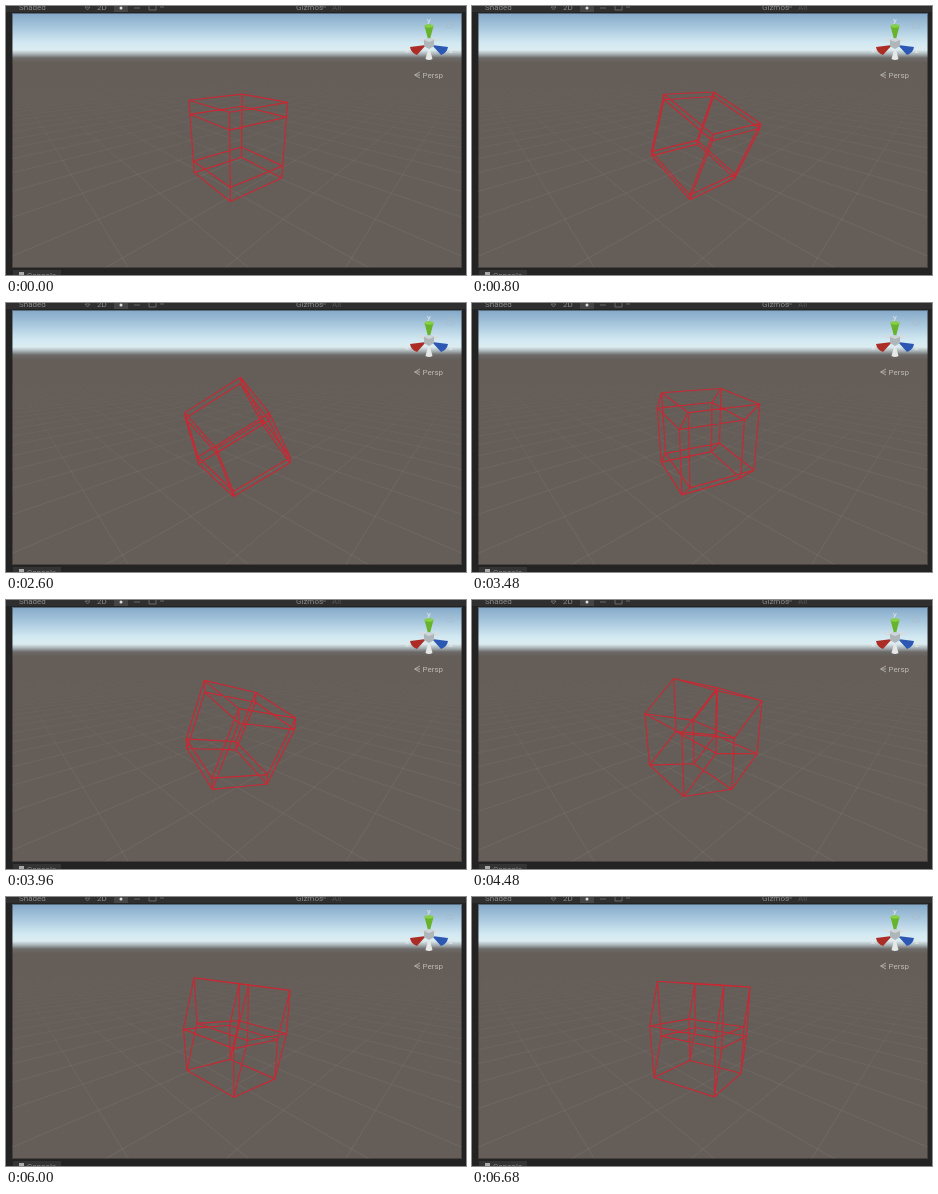
These frames come from a looping animation (460 by 269 pixels, 6720 ms). An HTML page:

```html
<!DOCTYPE html>
<html lang="en">
<head>
<meta charset="utf-8">
<title>Rotating hypercube</title>
<style>
html, body { margin: 0; width: 100%; height: 100%; overflow: hidden; background: #242323; }
svg { display: block; width: 460px; height: 269px; font-family: Roboto, "Open Sans", sans-serif; }
</style>
</head>
<body>
<svg viewBox="0 0 460 269">
  <defs>
    <linearGradient id="sky" gradientUnits="userSpaceOnUse" x1="0" y1="7" x2="0" y2="57">
      <stop offset="0" stop-color="#83a8c8"/>
      <stop offset=".3" stop-color="#a9c8de"/>
      <stop offset=".6" stop-color="#d2e9f2"/>
      <stop offset=".74" stop-color="#dcecf0"/>
      <stop offset=".82" stop-color="#a9b3b6"/>
      <stop offset=".9" stop-color="#6c6a68"/>
      <stop offset="1" stop-color="#645d58"/>
    </linearGradient>
    <linearGradient id="fade" gradientUnits="userSpaceOnUse" x1="0" y1="75" x2="0" y2="262">
      <stop offset="0" stop-color="#aaa49c" stop-opacity="0"/>
      <stop offset=".5" stop-color="#aaa49c" stop-opacity=".12"/>
      <stop offset="1" stop-color="#aaa49c" stop-opacity=".15"/>
    </linearGradient>
    <clipPath id="view"><rect x="6" y="7" width="450" height="255"/></clipPath>
  </defs>

  <rect width="460" height="269" fill="#242323"/>
  <rect width="460" height="6" fill="#302f2f"/>
  <rect x="108" width="14" height="6" fill="#454545"/>
  <g fill="#8b8b8b" font-size="8">
    <text x="13" y="4">Shaded</text>
    <text x="91" y="4">2D</text>
    <text x="290" y="4">Gizmos</text>
    <text x="326" y="4" fill="#555">All</text>
  </g>
  <circle cx="115" cy="2" r="1.500" fill="#ddd"/>
  <path d="M79 1h5l-2.500 3zM128 2h6M143 0v4h7V0M154 1h4M316 1h4" fill="none" stroke="#777" stroke-width=".8"/>
  <rect x="6" y="7" width="450" height="255" fill="url(#sky)"/>
  <path id="grid" clip-path="url(#view)" fill="none" stroke="url(#fade)"/>
  <rect x="6.500" y="7.500" width="449" height="254" fill="none" stroke="#242323" stroke-opacity=".45"/>
  <rect x="7" y="264" width="48" height="5" fill="#343434"/>
  <rect x="13" y="266" width="5" height="3" fill="#aaa"/>
  <text x="21" y="272" font-size="8" fill="#888">Console</text>

  <g>
    <path d="M423 38L412 34L415 31ZM423 38L434 34L431 31Z" fill="#d5dce0"/>
    <path d="M423 40L419.500 53Q423 55 426.500 53Z" fill="#e6e8e8"/>
    <path d="M423 37L418.500 20Q423 17 427.500 20Z" fill="#68b32c"/>
    <ellipse cx="423" cy="20" rx="4.500" ry="1.700" fill="#86d145"/>
    <path d="M420 39L404 41Q405 47 411 49Z" fill="#ab2d25"/>
    <path d="M426 39L442 41Q441 47 435 49Z" fill="#2c58b4"/>
    <path d="M418 34L423 32L428 34V40L423 43L418 40Z" fill="#aeb6b9"/>
    <path d="M418 34L423 32L428 34L423 36Z" fill="#cfd5d7"/>
    <g fill="#e4e8e9" font-size="8" text-anchor="middle">
      <text x="423" y="17">y</text>
      <text x="401" y="47">x</text>
      <text x="445" y="47">z</text>
    </g>
    <path d="M442 18v-2q2-3 4 0v2M441 18h6v4h-6z" fill="none" stroke="#a9b9c6" stroke-width=".6"/>
    <path d="M414 66L408.500 69L414 72M414 69h-5" fill="none" stroke="#b5b2ae" stroke-width=".9"/>
    <text x="416.500" y="72" font-size="8" fill="#bbb8b4">Persp</text>
  </g>
  <path id="cube" fill="none" stroke="#c92833" stroke-width="1.150" stroke-linecap="round" stroke-linejoin="round"/>
</svg>
<script>
const LOOP = 6720, EDGE = 66, CELL = EDGE / 2, FOCAL = 222, CX = 231, CY = 134.5;
const PITCH = Math.PI / 9, SIN = Math.sin(PITCH), COS = Math.cos(PITCH);
const X = 0, Y = 1, Z = 2, W = 3;

// Key angles in degrees; each turn follows a smooth curve through them.
const keyTimes = [0, 1640, 2600, 3480, 4480, 5320, 6680];
const turns = [
  { from: Z, to: W, angles: [0, 42, 67, 107, 93, 91, 88] },
  { from: X, to: W, angles: [0, -10, -31, 0, -29, 30, -15] },
  { from: X, to: Z, angles: [7, 0, 37, 18, 6, 7, -15] },
  { from: Y, to: W, angles: [168, 0, -95, -197, -327, -412, -576] }
];

function curve(values, t) {
  const last = values.length - 1;
  let k = 0;
  while (k < last - 1 && keyTimes[k + 1] <= t) k++;
  const span = i => keyTimes[i + 1] - keyTimes[i];
  const rate = i => {
    const lo = Math.max(0, i - 1), hi = Math.min(last, i + 1);
    return (values[hi] - values[lo]) / (keyTimes[hi] - keyTimes[lo]);
  };
  const u = Math.min(1, (t - keyTimes[k]) / span(k)), v = 1 - u;
  return values[k] * v * v * (1 + 2 * u) + values[k + 1] * u * u * (3 - 2 * u)
    + span(k) * u * v * (rate(k) * v - rate(k + 1) * u);
}

function rotate(p, from, to, degrees) {
  const a = degrees * Math.PI / 180, c = Math.cos(a), s = Math.sin(a);
  [p[from], p[to]] = [c * p[from] + s * p[to], c * p[to] - s * p[from]];
}

// The camera looks down at the origin from between the x and z axes.
function project(x, y, z) {
  const side = (z - x) * Math.SQRT1_2, away = -(x + z) * Math.SQRT1_2;
  const scale = FOCAL / (FOCAL + COS * away - SIN * y);
  const px = CX + side * scale, py = CY - (COS * y + SIN * away) * scale;
  return px.toFixed(2) + ' ' + py.toFixed(2);
}

function drawGrid() {
  let d = '';
  for (let i = -28; i <= 28; i++) {
    const c = i * CELL, end = 265 - c;
    d += `M${project(c, 0, -1400)}L${project(c, 0, end)}`;
    d += `M${project(-1400, 0, c)}L${project(end, 0, c)}`;
  }
  document.getElementById('grid').setAttribute('d', d);
}

const cube = document.getElementById('cube');

function draw(t) {
  const angles = turns.map(turn => curve(turn.angles, t));
  const points = Array.from({ length: 16 }, (_, n) => {
    const p = [X, Y, Z, W].map(axis => (n >> axis & 1 ? EDGE : -EDGE) / 2);
    turns.forEach((turn, i) => rotate(p, turn.from, turn.to, angles[i]));
    return project(p[X], p[Y], p[Z]);
  });
  let d = '';
  for (let n = 0; n < 16; n++)
    for (let bit = 1; bit < 16; bit *= 2)
      if (!(n & bit)) d += `M${points[n]}L${points[n | bit]}`;
  cube.setAttribute('d', d);
}

drawGrid();
draw(0);
const start = performance.now();
function tick() {
  draw((performance.now() - start) % LOOP);
  requestAnimationFrame(tick);
}
requestAnimationFrame(tick);
</script>
</body>
</html>
```
